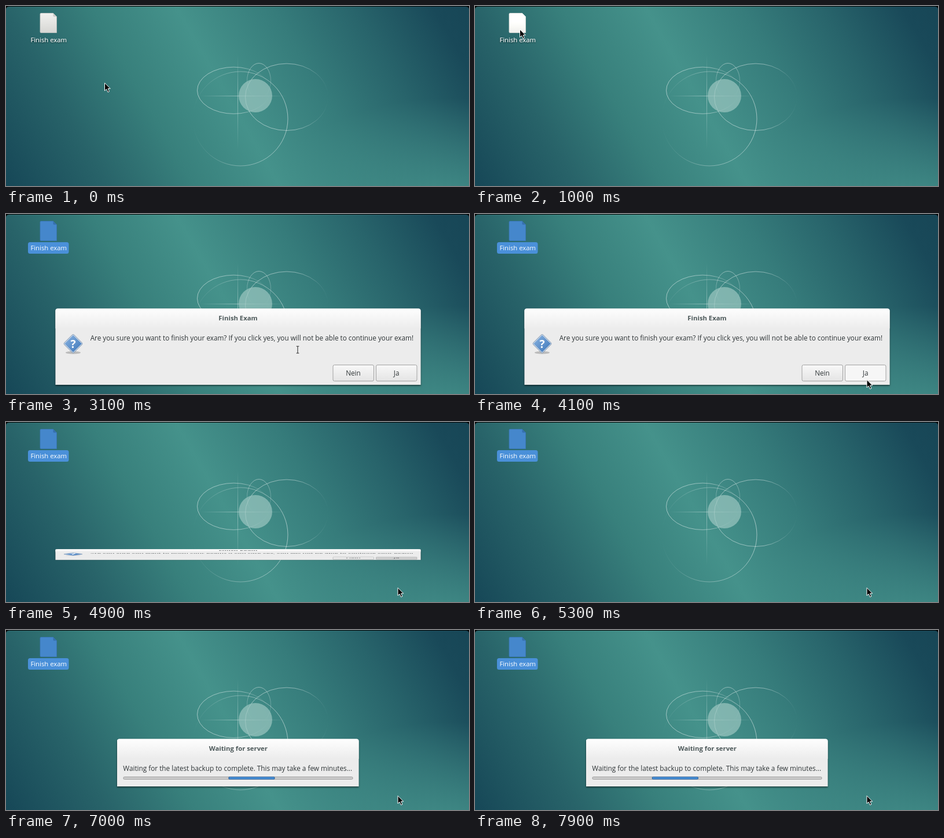
Write an HTML page that moves like this. It is 800 px wide and 313 px high and loops after 8000 ms.

```html
<!DOCTYPE html>
<html lang="en">
<head>
<meta charset="utf-8">
<title>Finish exam</title>
<style>
  html, body { margin: 0; width: 100%; height: 100%; overflow: hidden; background: #000; }
  svg { display: block; width: 800px; height: 313px; }
  text { font: 11.75px "Open Sans", "Noto Sans", sans-serif; fill: #2e3436; }
  .title { font-size: 11.3px; font-weight: 700; fill: #4c5859; text-anchor: middle; }
  .mid { text-anchor: middle; }
  .label { font-size: 11.3px; fill: #fff; text-anchor: middle; }
  .line { fill: none; stroke-width: 1; }
</style>
</head>
<body>
<svg viewBox="0 0 800 313" xmlns="http://www.w3.org/2000/svg">
  <defs>
    <linearGradient id="sky" gradientUnits="userSpaceOnUse" x1="-136" y1="78" x2="606" y2="-348">
      <stop offset="0" stop-color="#164757"/>
      <stop offset=".18" stop-color="#286369"/>
      <stop offset=".33" stop-color="#38807c"/>
      <stop offset=".48" stop-color="#45928b"/>
      <stop offset=".65" stop-color="#367c7b"/>
      <stop offset=".79" stop-color="#28646b"/>
      <stop offset=".93" stop-color="#194959"/>
      <stop offset="1" stop-color="#174656"/>
    </linearGradient>
    <radialGradient id="glow" gradientUnits="userSpaceOnUse" cx="0" cy="0" r="1"
        gradientTransform="translate(770 350) scale(330 190)">
      <stop offset="0" stop-color="#44908a" stop-opacity=".95"/>
      <stop offset="1" stop-color="#44908a" stop-opacity="0"/>
    </radialGradient>
    <linearGradient id="fadeRight">
      <stop offset="0" stop-color="#fff" stop-opacity=".5"/>
      <stop offset=".6" stop-color="#fff" stop-opacity=".42"/>
      <stop offset="1" stop-color="#fff" stop-opacity="0"/>
    </linearGradient>
    <linearGradient id="fadeLeft">
      <stop offset="0" stop-color="#fff" stop-opacity="0"/>
      <stop offset=".4" stop-color="#fff" stop-opacity=".28"/>
      <stop offset="1" stop-color="#fff" stop-opacity=".5"/>
    </linearGradient>
    <linearGradient id="fadeDown" x2="0" y2="1">
      <stop offset="0" stop-color="#fff" stop-opacity=".42"/>
      <stop offset="1" stop-color="#fff" stop-opacity="0"/>
    </linearGradient>
    <linearGradient id="rayX">
      <stop offset="0" stop-color="#fff" stop-opacity="0"/>
      <stop offset=".45" stop-color="#fff" stop-opacity=".4"/>
      <stop offset="1" stop-color="#fff" stop-opacity="0"/>
    </linearGradient>
    <linearGradient id="rayY" x2="0" y2="1">
      <stop offset="0" stop-color="#fff" stop-opacity="0"/>
      <stop offset=".45" stop-color="#fff" stop-opacity=".38"/>
      <stop offset="1" stop-color="#fff" stop-opacity="0"/>
    </linearGradient>
    <linearGradient id="paper" x2="0" y2="1">
      <stop offset="0" stop-color="#f2f2f0"/>
      <stop offset="1" stop-color="#d6d6d3"/>
    </linearGradient>
    <linearGradient id="header" x2="0" y2="1">
      <stop offset="0" stop-color="#fefefe"/>
      <stop offset="1" stop-color="#ececec"/>
    </linearGradient>
    <linearGradient id="button" x2="0" y2="1">
      <stop offset="0" stop-color="#f8f8f8"/>
      <stop offset="1" stop-color="#e4e4e4"/>
    </linearGradient>
    <linearGradient id="sign" x2="1" y2="1">
      <stop offset="0" stop-color="#8db6e2"/>
      <stop offset="1" stop-color="#3b74b8"/>
    </linearGradient>
    <linearGradient id="pulse" x2="0" y2="1">
      <stop offset="0" stop-color="#5a9fe3"/>
      <stop offset="1" stop-color="#3f86d0"/>
    </linearGradient>
    <filter id="shadow" x="-5%" y="-10%" width="110%" height="125%">
      <feDropShadow dx="0" dy="1.5" stdDeviation="1.8" flood-color="#000" flood-opacity=".6"/>
    </filter>
    <filter id="textShadow" x="-10%" y="-20%" width="120%" height="150%">
      <feDropShadow dx="0" dy="1" stdDeviation=".8" flood-color="#000" flood-opacity=".75"/>
    </filter>
  </defs>

  <!-- Wallpaper -->
  <rect width="800" height="313" fill="url(#sky)"/>
  <rect width="800" height="313" fill="url(#glow)"/>
  <g class="line">
    <ellipse cx="393.5" cy="146.8" rx="63" ry="40.6" stroke="url(#fadeRight)"/>
    <circle cx="405" cy="196" r="82" stroke="url(#fadeLeft)"/>
    <ellipse cx="485" cy="158.3" rx="71.5" ry="58.2" stroke="url(#fadeRight)"/>
    <ellipse cx="437" cy="130" rx="20.5" ry="30.5" stroke="url(#fadeDown)"/>
  </g>
  <rect x="400" y="85" width="1" height="165" fill="url(#rayY)"/>
  <rect x="335" y="156" width="150" height="1" fill="url(#rayX)"/>
  <circle cx="431" cy="156" r="29" fill="#9cc6c1" opacity=".7"/>
  <path d="M0 0H800V6Q800 1 794 1H6Q0 1 0 6Z" fill="#000"/>

  <!-- Desktop icon -->
  <g id="icon">
    <path id="sheet" d="M60.5 12.5H81.5L87.5 18.5V46.5H60.5Q59 46.5 59 45V14Q59 12.5 60.5 12.5Z"/>
    <path id="fold" d="M81.5 12.5V17Q81.5 18.5 83 18.5H87.5Z"/>
    <rect id="labelBox" x="38" y="49" width="70.5" height="20" rx="3.5" fill="#4a90d9"/>
    <text id="label" class="label" x="73.7" y="63">Finish exam</text>
  </g>

  <g id="question">
    <g filter="url(#shadow)">
      <path d="M85.5 297V168.5Q85.5 164.5 89.5 164.5H712.5Q716.5 164.5 716.5 168.5V297Z" fill="#ececec"/>
    </g>
    <path d="M85.5 199V168.5Q85.5 164.5 89.5 164.5H712.5Q716.5 164.5 716.5 168.5V199Z" fill="url(#header)"/>
    <text class="title" x="401" y="185">Finish Exam</text>
    <ellipse cx="116" cy="241" rx="13" ry="2.5" fill="#000" opacity=".2"/>
    <rect x="-11.7" y="-11.7" width="23.4" height="23.4" rx="1.8" transform="translate(116 225.5) rotate(45)"
        fill="#fff" stroke="#8199b5" stroke-width="1"/>
    <path d="M116 210.5L131 225.5L116 240.5L101 225.5Z" fill="url(#sign)"/>
    <text x="116" y="232.5" class="mid" style="font-size:19px;font-weight:700;fill:#fff">?</text>
    <text x="145.7" y="220">Are you sure you want to finish your exam? If you click yes, you will not be able to continue your exam!</text>
    <g stroke="#a2a2a2">
      <rect x="565" y="262.5" width="70.5" height="28" rx="2.5" fill="url(#button)"/>
      <rect id="yes" x="639.5" y="262.5" width="70.5" height="28" rx="2.5"/>
    </g>
    <text class="mid" x="600" y="281">Nein</text>
    <text class="mid" x="674.7" y="281">Ja</text>
  </g>

  <g id="waiting">
    <g filter="url(#shadow)">
      <path d="M192 272V193.5Q192 189.5 196 189.5H605.5Q609.5 189.5 609.5 193.5V272Z" fill="#ececec"/>
    </g>
    <path d="M192 224V193.5Q192 189.5 196 189.5H605.5Q609.5 189.5 609.5 193.5V224Z" fill="url(#header)"/>
    <text class="title" x="401.3" y="210">Waiting for server</text>
    <text x="202.3" y="245">Waiting for the latest backup to complete. This may take a few minutes...</text>
    <rect x="203" y="255.5" width="396" height="4" rx="1.5" fill="#cfcfcf" stroke="#989898"/>
    <rect id="block" y="255.5" width="79" height="4" rx="1" fill="url(#pulse)" stroke="#25588f"/>
  </g>

  <path id="arrow" d="M.5 .8V14.3L3.6 11.5L6 16.8L8.4 15.7L6.1 10.6H10.2Z" fill="#000" stroke="#fff" stroke-width="1"/>
  <g id="beam" fill="none" stroke-linecap="square">
    <path d="M-2 -6H2M-2 6H2M0 -6V6" stroke="#fff" stroke-width="2.6"/>
    <path d="M-2 -6H2M-2 6H2M0 -6V6" stroke="#222" stroke-width="1.1"/>
  </g>
</svg>

<script>
const LOOP = 8000, STEP = 100, CENTER_Y = 230.5;
const el = id => document.getElementById(id);
const set = (id, attrs) => {
  for (const [name, value] of Object.entries(attrs)) el(id).setAttribute(name, value);
};
const show = (id, on) => { el(id).style.display = on ? "" : "none"; };
const smooth = p => p * p * (3 - 2 * p);
const easeOut = p => 1 - (1 - p) ** 2;
const linear = p => p;

// Pointer stops: time, x, y and the easing used to get there.
const STOPS = [
  [0, 170, 133], [200, 170, 133], [1000, 77, 40, smooth],
  [2100, 77, 40], [2500, 344.5, 172.5, smooth],
  [3000, 344.5, 172.5], [3100, 504, 236], [3500, 706, 288.5, easeOut],
  [3800, 675.5, 286.5, smooth], [4000, 675.5, 286.5], [4100, 676.5, 287.5],
  [LOOP, 676.5, 287.5]
];

function pointerAt(t) {
  const i = STOPS.findIndex(stop => stop[0] > t);
  const [t0, x0, y0] = STOPS[i - 1], [t1, x1, y1, ease = linear] = STOPS[i];
  const p = ease((t - t0) / (t1 - t0));
  return [x0 + (x1 - x0) * p, y0 + (y1 - y0) * p];
}

const inside = ([x, y], left, top, right, bottom) =>
  x >= left && x <= right && y >= top && y <= bottom;

// Dialogs unfold and collapse vertically around their middle.
const opening = age => age < 0 ? 0 : Math.min(1, .97 + age * .0002);
const closing = age => age < 0 ? 1 : Math.max(0, 1 - age / 250) ** 2;

function scaleDialog(id, scale) {
  show(id, scale > 0);
  set(id, { transform: `translate(0 ${CENTER_Y * (1 - scale)}) scale(1 ${scale})` });
}

function pulseX(t) {
  const phase = ((t - 5574) / 1000 % 2 + 2) % 2;
  return 203 + 317 * (1 - Math.abs(1 - phase));
}

function drawIcon(selected, hover) {
  set("sheet", {
    fill: selected ? (hover ? "#4f94dc" : "#4587cc") : "url(#paper)",
    stroke: selected ? (hover ? "#4a90d9" : "#3a76b6") : "#c3c5c2",
    "stroke-width": .8
  });
  set("fold", { fill: selected ? (hover ? "#4a90d9" : "#3670ad") : hover ? "#fff" : "#c9cac7" });
  el("sheet").style.filter = hover && !selected ? "brightness(1.12)" : "";
  show("labelBox", selected);
  set("label", { filter: selected ? "none" : "url(#textShadow)" });
}

function render(time) {
  const t = Math.floor(time / STEP) * STEP;
  const pointer = pointerAt(t);
  const [x, y] = pointer;

  drawIcon(t >= 1300, inside(pointer, 59, 12, 88, 69));

  scaleDialog("question", Math.min(opening(t - 1700), closing(t - 4743)));
  const hoverYes = inside(pointer, 640, 262, 710, 291);
  set("yes", { fill: t >= 4800 ? "#d2d2d2" : hoverYes ? "#f6f6f6" : "url(#button)" });

  scaleDialog("waiting", opening(t - 5400));
  set("block", { x: pulseX(t) });

  const overText = t >= 1700 && t < 4743 && inside(pointer, 145, 205, 706, 252);
  show("arrow", !overText);
  show("beam", overText);
  set(overText ? "beam" : "arrow", { transform: `translate(${x} ${y})` });
}

const start = performance.now();
function tick() {
  render((performance.now() - start) % LOOP);
  requestAnimationFrame(tick);
}
tick();
</script>
</body>
</html>
```
